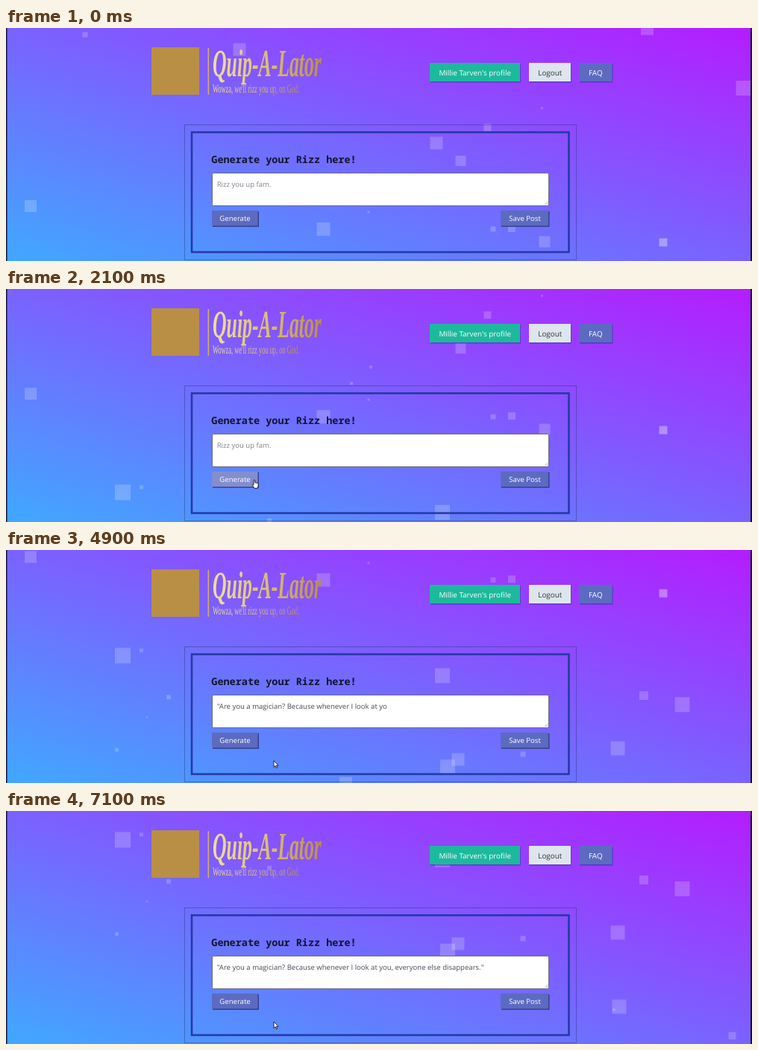
These frames come from a looping animation (1000 by 314 pixels, 7200 ms). An HTML page:

```html
<!DOCTYPE html>
<html lang="en">
<head>
<meta charset="utf-8">
<title>Pick-up line generator</title>
<style>
  html, body { margin: 0; width: 100%; height: 100%; overflow: hidden; background: #7a62ff; }
  .stage {
    position: relative; width: 1000px; height: 314px; overflow: hidden;
    background: linear-gradient(to top right, #40a8ff, #7a62ff 50%, #b41cff);
  }
  svg { display: block; }
  text { font: 9.55px "Open Sans", "Noto Sans", sans-serif; text-rendering: geometricPrecision; white-space: pre; }
  .nav text { font-size: 9.9px; }
  .mid { text-anchor: middle; }
  .light { fill: #fff; }
  .logo { font: italic bold 52px "Liberation Serif", serif; }
  .tag { font: 16px "Liberation Serif", serif; }
  .heading { font: bold 13.5px "Noto Sans Mono", "DejaVu Sans Mono", monospace; fill: #12152f; }

  #squares { animation: drift 7.2s steps(72) infinite; }
  .cursor { animation: travel 7.2s linear infinite; fill: #fff; stroke: #16162a; stroke-width: .9; stroke-linejoin: round; }
  .arrow { animation: arrow 7.2s step-end infinite; }
  .hand { animation: hand 7.2s step-end infinite; }
  .hover { animation: hover 7.2s linear infinite; }

  @keyframes drift { to { transform: translateY(-338.9px); } }
  @keyframes travel {
    0%, 8.3% { transform: translate(420px, 322px); }
    12.5% { transform: translate(387px, 300px); }
    20.8%, 38% { transform: translate(332px, 257px); }
    43% { transform: translate(332px, 268px); }
    45.8% { transform: translate(332px, 277px); }
    50%, 100% { transform: translate(359px, 284px); }
  }
  @keyframes arrow { 0% { opacity: 1; } 20% { opacity: 0; } 43% { opacity: 1; } }
  @keyframes hand { 0% { opacity: 0; } 20% { opacity: 1; } 43% { opacity: 0; } }
  @keyframes hover { 0%, 20% { opacity: 0; } 22.5%, 43% { opacity: .24; } 48.6%, 100% { opacity: 0; } }
</style>
</head>
<body>
<div class="stage">
<svg width="1000" height="314" viewBox="0 0 1000 314">
  <defs>
    <linearGradient id="gold">
      <stop offset="0" stop-color="#f0df98"/>
      <stop offset=".5" stop-color="#dcc070"/>
      <stop offset="1" stop-color="#b98d48"/>
    </linearGradient>
  </defs>

  <g id="squares" fill="#fff"></g>

  <rect x="195" y="26" width="64" height="64" fill="#b98f45"/>
  <rect x="270.5" y="27" width="1.6" height="63" fill="#cfae62"/>
  <g fill="url(#gold)">
    <text class="logo" transform="translate(277 65) scale(.495 1)">Quip-A-Lator</text>
    <text class="tag" transform="translate(277 87) scale(.525 1)">Wowza, we'll rizz you up, on God.</text>
  </g>

  <g class="nav mid">
    <rect x="569" y="48" width="121" height="25.5" fill="#23309a" opacity=".45"/>
    <rect x="568" y="47" width="121" height="25" fill="#1db99c"/>
    <text class="light" x="628.7" y="63.5" font-weight="500" style="font-weight:500">Millie Tarven's profile</text>
    <rect x="702" y="48" width="56" height="25.5" fill="#23309a" opacity=".45"/>
    <rect x="701" y="47" width="56" height="25" fill="#dde6ec"/>
    <text x="729.3" y="63.5" fill="#33363c">Logout</text>
    <rect x="769" y="48" width="44.5" height="25.5" fill="#23309a" opacity=".55"/>
    <rect x="768" y="47" width="44.5" height="25" fill="#5c6bc0"/>
    <text class="light" x="790.3" y="63.5">FAQ</text>
  </g>

  <rect x="239.5" y="130.5" width="525" height="182" fill="none" stroke="#20285c" stroke-opacity=".75" stroke-dasharray="1 1"/>
  <rect x="249" y="140.5" width="505.5" height="161.5" fill="none" stroke="#2639a6" stroke-width="2.6"/>
  <text class="heading" x="275.3" y="181.7">Generate your Rizz here!</text>

  <rect x="276.5" y="195.5" width="451" height="44" rx="2" fill="#fff" stroke="#6c6c86"/>
  <path d="M722.5 238l4-4M725 238l1.500-1.500" stroke="#888" stroke-width=".7"/>
  <text id="line" x="282.7" y="214"></text>

  <g class="mid">
    <rect x="277" y="247" width="62" height="21" fill="#34428e"/>
    <rect x="276" y="246" width="61.500" height="20.500" fill="#5c6bc0"/>
    <rect class="hover" x="276" y="246" width="61.500" height="20.500" fill="#fff"/>
    <text class="light" x="307" y="260.300">Generate</text>
    <rect x="664" y="247" width="64.500" height="21" fill="#34428e"/>
    <rect x="663" y="246" width="64" height="20.500" fill="#5c6bc0"/>
    <text class="light" x="695.500" y="260.300">Save Post</text>
  </g>

  <g class="cursor">
    <path class="arrow" d="M0 0v8.600l2-1.800 1.400 3.100 1.300-.6-1.400-3h2.700z"/>
    <path class="hand" d="M0 .8q.9-1.300 1.800 0v3.400q.8-.7 1.500.2.800-.6 1.500.3 1-.4 1.300.6v3.200l-.9 3h-4.200l-3-4.300q.2-1.300 2 0z"/>
  </g>

  <rect width="1.500" height="314" fill="#15173c"/>
  <rect x="998" width="2" height="314" fill="#100d30"/>
</svg>
</div>
<script>
  const LOOP = 7200, STEP = 100;
  const QUOTE = '"Are you a magician? Because whenever I look at you, everyone else disappears."';
  const HINT = 'Rizz you up fam.';

  // centre x, centre y at the start, size
  const SQUARES = [
    [33, 240, 16], [577, 155, 17], [609.5, 179, 14], [645.5, 134, 10], [859.5, 1, 17],
    [106, 9, 7], [313, 29, 17], [988.5, 81, 20], [881, 289, 11], [722, 288, 15],
    [678, 270, 10], [653, 271, 7], [425.5, 271, 18], [486, 248, 3], [718.5, 108, 3],
    [489, 204, 4], [463, 226, 4], [156.5, 373, 21], [181.5, 366, 5], [585, 400, 20],
    [353, 411, 6], [218, 429, 6], [855, 427, 12], [906.5, 439, 20], [820, 498, 19],
    [189, 456, 2.5], [148.5, 500, 5], [455.500, 545, 17], [592, 523, 20], [606, 513, 17],
    [693, 506, 7], [822, 598, 19], [815, 602, 4], [973.5, 637, 10]
  ];
  const BRIGHT_X = 881;

  document.getElementById('squares').innerHTML = SQUARES.map(([x, y, s]) =>
    `<rect x="${x - s / 2}" y="${y - s / 2}" width="${s}" height="${s}" opacity="${x === BRIGHT_X ? .36 : .2}"/>`
  ).join('');

  // time, characters typed
  const TYPING = [[2400, 0], [3300, 18], [4000, 33], [5800, 68], [6400, QUOTE.length]];

  function typedAt(t) {
    const i = TYPING.findIndex(([time]) => time > t);
    if (i === 0) return 0;
    if (i < 0) return QUOTE.length;
    const [t0, n0] = TYPING[i - 1], [t1, n1] = TYPING[i];
    return Math.floor(n0 + (n1 - n0) * (t - t0) / (t1 - t0));
  }

  const line = document.getElementById('line');
  let start;

  function draw(now) {
    start ??= now;
    const t = Math.floor((now - start) % LOOP / STEP) * STEP;
    const count = typedAt(t);
    line.textContent = count ? QUOTE.slice(0, count) : HINT;
    line.setAttribute('fill', count ? '#484b55' : '#7d828c');
    requestAnimationFrame(draw);
  }
  requestAnimationFrame(draw);
</script>
</body>
</html>
```
